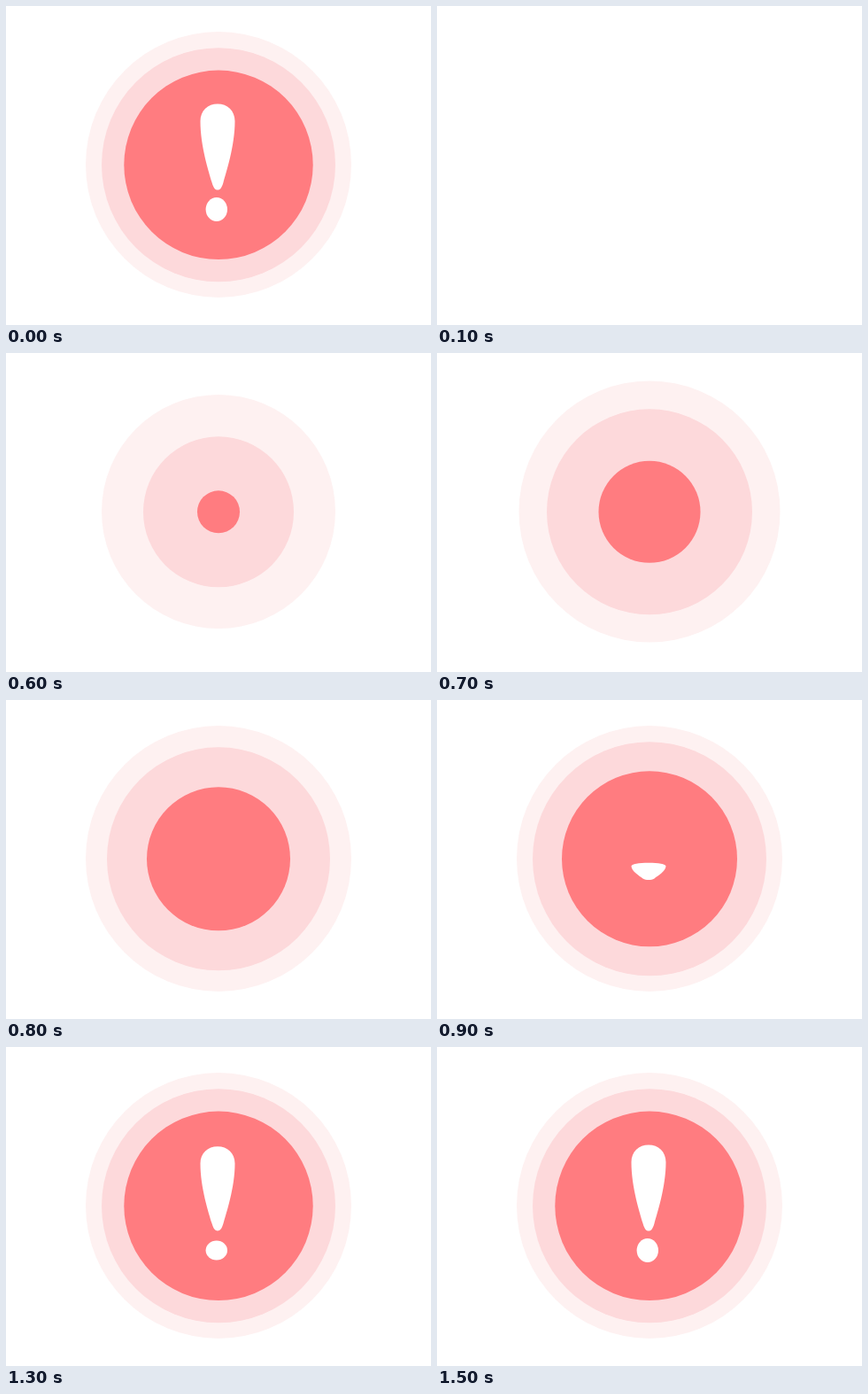
Animation of 480x360 px, one loop 3100 ms. Source, as an HTML page:

```html
<!DOCTYPE html>
<html lang="en">
<head>
<meta charset="utf-8">
<title>Alert</title>
<style>
  html, body { margin: 0; height: 100%; overflow: hidden; background: #fff; }
  svg { display: block; width: 480px; height: 360px; }
</style>
</head>
<body>
<svg viewBox="0 0 480 360">
  <circle id="outer" cx="240" cy="179" r="0" fill="#fef1f1"/>
  <circle id="middle" cx="240" cy="179.3" r="0" fill="#fdd9db"/>
  <circle id="inner" cx="240" cy="179.3" r="0" fill="#ff7c80"/>
  <g fill="#fff">
    <path id="stroke" d="M239 110.5C250 110.5 258.5 118 258.5 130C258.5 158 248.5 188 245.5 199C243.5 206 241.5 207.5 239 207.5C236.5 207.5 234.5 206 232.5 199C229 187 219.5 158 219.5 130C219.5 118 228 110.5 239 110.5Z"/>
    <ellipse id="dot" cx="237.8" cy="229.5" rx="12.2" ry="13.6"/>
  </g>
</svg>
<script>
  const LOOP = 3100, STEP = 100;
  const get = id => document.getElementById(id);

  // Each ring grows in 100 ms steps, then keeps its last radius.
  const rings = [
    { el: get('outer'), start: 3, radii: [24, 64, 101, 132, 147.5, 150] },
    { el: get('middle'), start: 3, radii: [2, 19.5, 53, 85, 116, 126, 132] },
    { el: get('inner'), start: 4, radii: [1, 6, 24, 57.5, 81, 99, 106.7] }
  ];

  // Both parts of the mark stretch vertically with an overshoot.
  const bounce = [0.2, 0.8, 1.07, 1.03, 0.98, 0.99, 1];
  const parts = [
    { el: get('stroke'), start: 9, end: 15, anchor: 202 },
    { el: get('dot'), start: 12, end: 15, anchor: 229.5 }
  ];

  const valueAt = (list, i) => i < 0 ? 0 : list[Math.min(i, list.length - 1)];

  function draw() {
    // The loop opens on the finished sign.
    const step = Math.floor(performance.now() % LOOP / STEP) || LOOP / STEP;
    for (const { el, start, radii } of rings) {
      el.setAttribute('r', valueAt(radii, step - start));
    }
    for (const { el, start, end, anchor } of parts) {
      const scale = step >= end ? 1 : valueAt(bounce, step - start);
      el.setAttribute('visibility', scale ? 'visible' : 'hidden');
      el.setAttribute('transform', `translate(0 ${anchor * (1 - scale)}) scale(1 ${scale})`);
    }
    requestAnimationFrame(draw);
  }
  draw();
</script>
</body>
</html>
```
